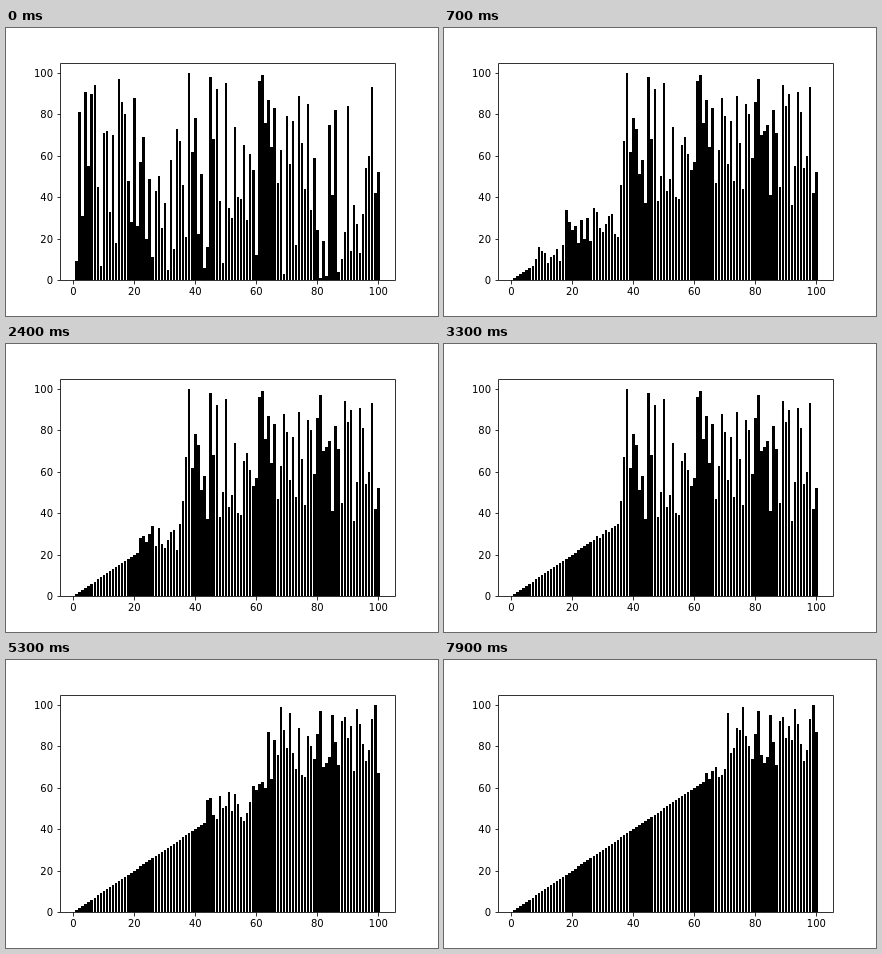
An HTML page that plays this animation: 432 by 288 pixels, repeating every 8000 ms.

```html
<!DOCTYPE html>
<html lang="en">
<head>
<meta charset="utf-8">
<title>Quicksort bars</title>
<style>
  html, body { margin: 0; width: 100%; height: 100%; overflow: hidden; background: #fff; }
  svg { display: block; width: 432px; height: 288px; }
  #bars { fill: #000; shape-rendering: crispEdges; }
  #axes { fill: none; stroke: #000; stroke-width: 0.8; }
  text { font: 10px "DejaVu Sans", sans-serif; fill: #000; }
  .x { text-anchor: middle; }
  .y { text-anchor: end; }
</style>
</head>
<body>
<svg viewBox="0 0 432 288">
  <path id="bars"/>
  <path id="axes"/>
  <g id="labels"></g>
</svg>
<script>
const STEP = 100, COUNT = 80;
const BASE = 252, LEFT = 54;
const UNIT_X = 334.8 / 109.78, UNIT_Y = 217.44 / 105;
const toX = v => LEFT + (v + 4.39) * UNIT_X;
const toY = v => BASE - v * UNIT_Y;

const values = [
  9, 81, 31, 91, 55, 90, 94, 45, 7, 71, 72, 33, 70, 18, 97, 86, 80, 48, 28, 88,
  26, 57, 69, 20, 49, 11, 43, 50, 25, 37, 5, 58, 15, 73, 67, 46, 21, 100, 62, 78,
  22, 51, 6, 16, 98, 68, 92, 38, 8, 95, 35, 30, 74, 40, 39, 65, 29, 61, 53, 12,
  96, 99, 76, 87, 64, 83, 47, 63, 3, 79, 56, 77, 17, 89, 66, 44, 85, 34, 59, 24,
  1, 19, 2, 75, 41, 82, 4, 10, 23, 84, 14, 36, 27, 13, 32, 54, 60, 93, 42, 52
];

// Bar edges snap to whole pixels.
function barPath(list) {
  return list.map((v, i) => {
    const x0 = Math.round(toX(i + 0.6)), x1 = Math.round(toX(i + 1.4));
    return `M${x0} ${BASE}V${Math.round(toY(v))}H${x1}V${BASE}z`;
  }).join("");
}

// One picture per call: the range is partitioned, then shown.
function sortSteps(a) {
  const steps = [barPath(a)];
  (function sort(lo, hi) {
    const pivot = a[Math.ceil((lo + hi) / 2)];
    let i = lo, j = hi;
    while (i <= j) {
      while (a[i] < pivot) i++;
      while (a[j] > pivot) j--;
      if (i <= j) {
        [a[i], a[j]] = [a[j], a[i]];
        i++;
        j--;
      }
    }
    steps.push(barPath(a));
    if (hi - lo < 2) return;
    sort(lo, j);
    sort(i, hi);
  })(0, a.length - 1);
  return steps;
}

function drawAxes() {
  let path = "M54.5 35.5H389.5V252.5H54.5z";
  let labels = "";
  for (let v = 0; v <= 100; v += 20) {
    const x = Math.round(toX(v)) + 0.5, y = Math.round(toY(v)) + 0.5;
    path += `M${x} 252.5V256.5M54.5 ${y}H51.5`;
    labels += `<text class="x" x="${toX(v).toFixed(2)}" y="267">${v}</text>`;
    labels += `<text class="y" x="47" y="${y + 3.5}">${v}</text>`;
  }
  document.getElementById("axes").setAttribute("d", path);
  document.getElementById("labels").innerHTML = labels;
}

const bars = document.getElementById("bars");
const steps = sortSteps(values);
const start = performance.now();
let shown = -1;

function tick() {
  const n = Math.floor((performance.now() - start) / STEP) % COUNT;
  if (n !== shown) {
    bars.setAttribute("d", steps[n]);
    shown = n;
  }
  requestAnimationFrame(tick);
}

drawAxes();
tick();
</script>
</body>
</html>
```
